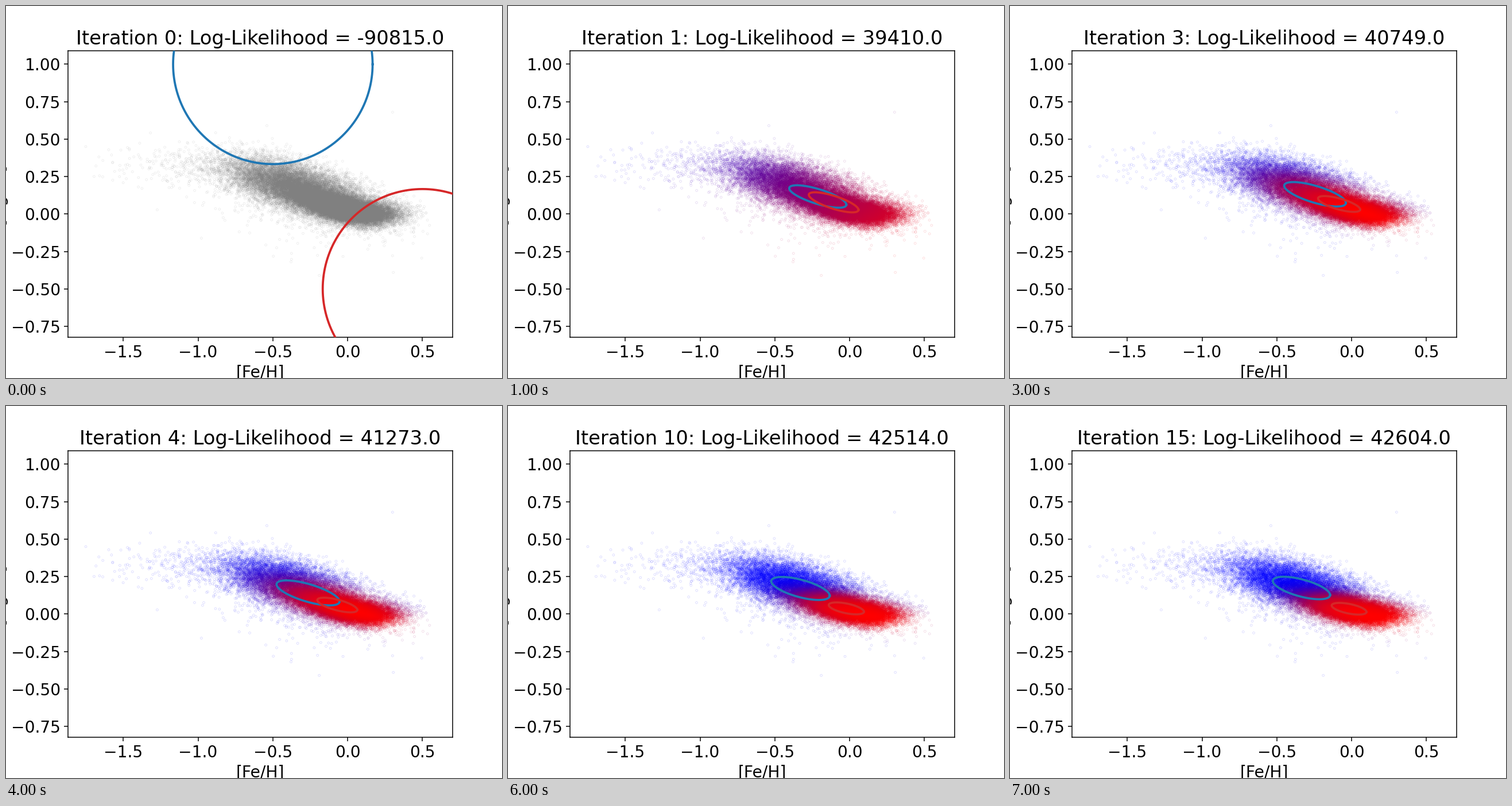
A matplotlib script that plays this animation: 864x648 px, repeating every 8000 ms.

```python
import numpy as np
import matplotlib.pyplot as plt
from matplotlib.animation import FuncAnimation

plt.rcParams.update({"font.family": "DejaVu Sans", "font.size": 15})
SIGMA_SHOWN = 2 / 3  # ellipses are drawn at this many standard deviations
RED_WEIGHT = 0.55
ITERATIONS = [0, 1, 2, 3, 4, 5, 10, 15]
LIKELIHOODS = [-90815, 39410, 40110, 40749, 41273, 41684, 42514, 42604]

rng = np.random.default_rng(7)


def mix(a, b, s):
    return a + (b - a) * s


def fit(n):
    """Blue and red ellipse after n iterations:
    centre x, centre y, half width, half height, correlation."""
    if n == 0:
        return (-.5, 1, 2 / 3, 2 / 3, 0), (.5, -.5, 2 / 3, 2 / 3, 0)
    s = 1 - np.exp(-.105 * (n - 1) ** 1.5)
    swell, shrink = s * (1 - s), np.sqrt(s)
    blue = (mix(-.213, -.336, s), mix(.117, .174, s),
            .191 + .08 * swell, .075 + .035 * swell, mix(-.73, -.62, s))
    red = (mix(-.107, -.017, s), mix(.078, .035, s),
           mix(.166, .116, shrink), mix(.067, .039, shrink), mix(-.75, -.55, s))
    return blue, red


def cloud(n, mx, my, sx, sy, r=0.0, bend=0.0):
    u, v = rng.standard_normal((2, n))
    y = my + sy * (r * u + np.sqrt(1 - r * r) * v) + bend * (u * u - 1)
    return np.column_stack([mx + sx * u, y])


def make_stars():
    thin = cloud(22500, -.017, .038, .163, .052, -.6, bend=.007)
    thick = cloud(16700, -.325, .170, .235, .097, -.62)
    halo = cloud(330, -1.0, .32, .28, .07)
    strays = cloud(300, -.25, .02, .38, .14, -.4)
    lone = [(.3, .68), (-.19, -.41), (.305, -.39), (-.54, .59), (-1.75, .45)]
    stars = np.vstack([thin, thick, halo, strays])
    x, y = stars.T
    inside = (x > -1.72) & (x < .55) & (y > -.36) & (y < .57)
    stars = np.vstack([stars[inside], lone])
    rng.shuffle(stars)
    return stars


def density(points, ellipse):
    mx, my, a, b, r = ellipse
    sx, sy = a / SIGMA_SHOWN, b / SIGMA_SHOWN
    u, v = (points[:, 0] - mx) / sx, (points[:, 1] - my) / sy
    q = (u * u + v * v - 2 * r * u * v) / (1 - r * r)
    return np.exp(-q / 2) / (sx * sy * np.sqrt(1 - r * r))


def star_colors(n):
    """Grey at first, then blue to red by membership in the previous fit."""
    rgba = np.full((len(stars), 4), 0.5)
    rgba[:, 3] = 0.16
    if n > 0:
        blue, red = (density(stars, e) for e in fit(n - 1))
        p = RED_WEIGHT * red / (RED_WEIGHT * red + (1 - RED_WEIGHT) * blue + 1e-300)
        p = (p - p.min()) / (p.max() - p.min())
        rgba[:, 0], rgba[:, 1], rgba[:, 2] = p, 0, 1 - p
    return rgba


def outline(ellipse):
    mx, my, a, b, r = ellipse
    t = np.linspace(0, 2 * np.pi, 181)
    return (mx + a * np.cos(t),
            my + b * (r * np.cos(t) + np.sqrt(1 - r * r) * np.sin(t)))


stars = make_stars()

fig, ax = plt.subplots(figsize=(6.4, 4.8), dpi=135)
fig.subplots_adjust(left=.125, right=.9, bottom=.11, top=.88)
ax.set(xlim=(-1.869, .7), ylim=(-.822, 1.091),
       xticks=np.arange(-1.5, .6, .5), yticks=np.arange(-.75, 1.1, .25),
       xlabel="[Fe/H]", ylabel="[Mg/Fe]")
title = ax.set_title("", fontsize=18)

dots = ax.scatter(*stars.T, s=4, facecolors="none", edgecolors="gray", linewidths=.4)
rings = [ax.plot([], [], color=c, lw=2, zorder=5)[0] for c in ("tab:blue", "tab:red")]


def update(i):
    n = ITERATIONS[i]
    title.set_text(f"Iteration {n}: Log-Likelihood = {LIKELIHOODS[i]:.1f}")
    dots.set_edgecolors(star_colors(n))
    for ring, ellipse in zip(rings, fit(n)):
        ring.set_data(*outline(ellipse))
    return [title, dots, *rings]


anim = FuncAnimation(fig, update, frames=len(ITERATIONS), init_func=lambda: update(0),
                     interval=1000, repeat=True, repeat_delay=0)
plt.show()
```
